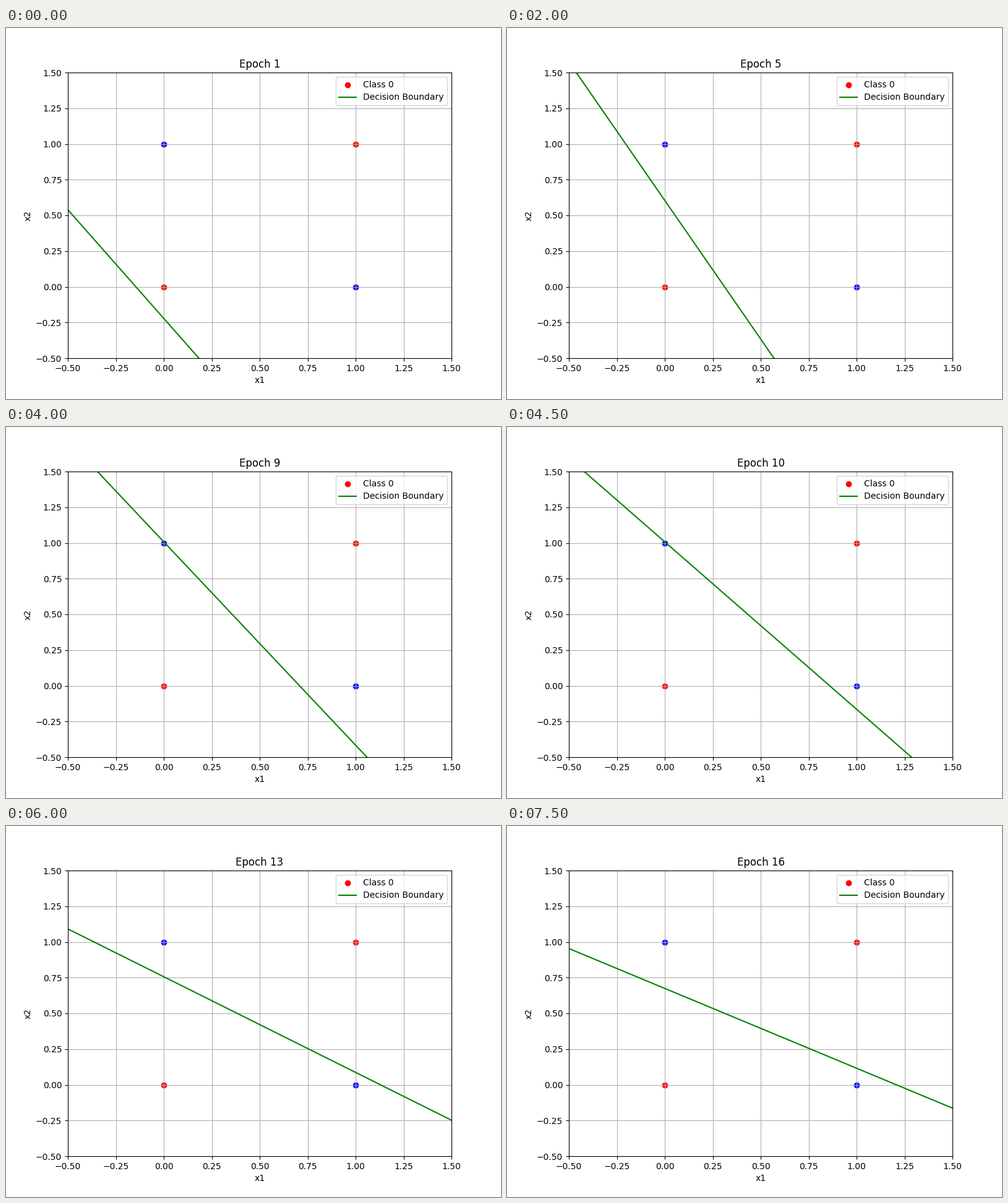
These frames come from a looping animation (800x600 px, 8000 ms). A matplotlib script:

```python
import numpy as np
import matplotlib.pyplot as plt
from matplotlib.animation import FuncAnimation

EPOCHS = 16
RATE = 0.1
X = np.array([[0, 0], [0, 1], [1, 0], [1, 1]])
y = np.array([0, 1, 1, 0])  # XOR


def train(w, b):
    """Run the perceptron rule and return (w1, w2, b) after every epoch."""
    history = []
    for _ in range(EPOCHS):
        for point, label in zip(X, y):
            error = label - int(w @ point + b >= 0)
            w = w + RATE * error * point
            b += RATE * error
        history.append((*w, b))
    return history


history = train(np.array([1.4665, 0.998]), 0.399)

fig, ax = plt.subplots(figsize=(8, 6), dpi=100)
ax.scatter(*X[y == 0].T, color="red", label="Class 0")
ax.scatter(*X[y == 1].T, color="blue")
xs = np.array([-0.5, 1.5])
line, = ax.plot(xs, xs, color="green", label="Decision Boundary")
ax.set(xlim=(-0.5, 1.5), ylim=(-0.5, 1.5), xlabel="x1", ylabel="x2")
ax.grid(True)
ax.legend(loc="upper right")
title = ax.set_title("Epoch 1")


def update(i):
    w1, w2, b = history[i]
    line.set_ydata(-(w1 * xs + b) / w2)
    title.set_text(f"Epoch {i + 1}")
    return line, title


anim = FuncAnimation(fig, update, frames=EPOCHS, interval=500, repeat=True)
plt.show()
```
